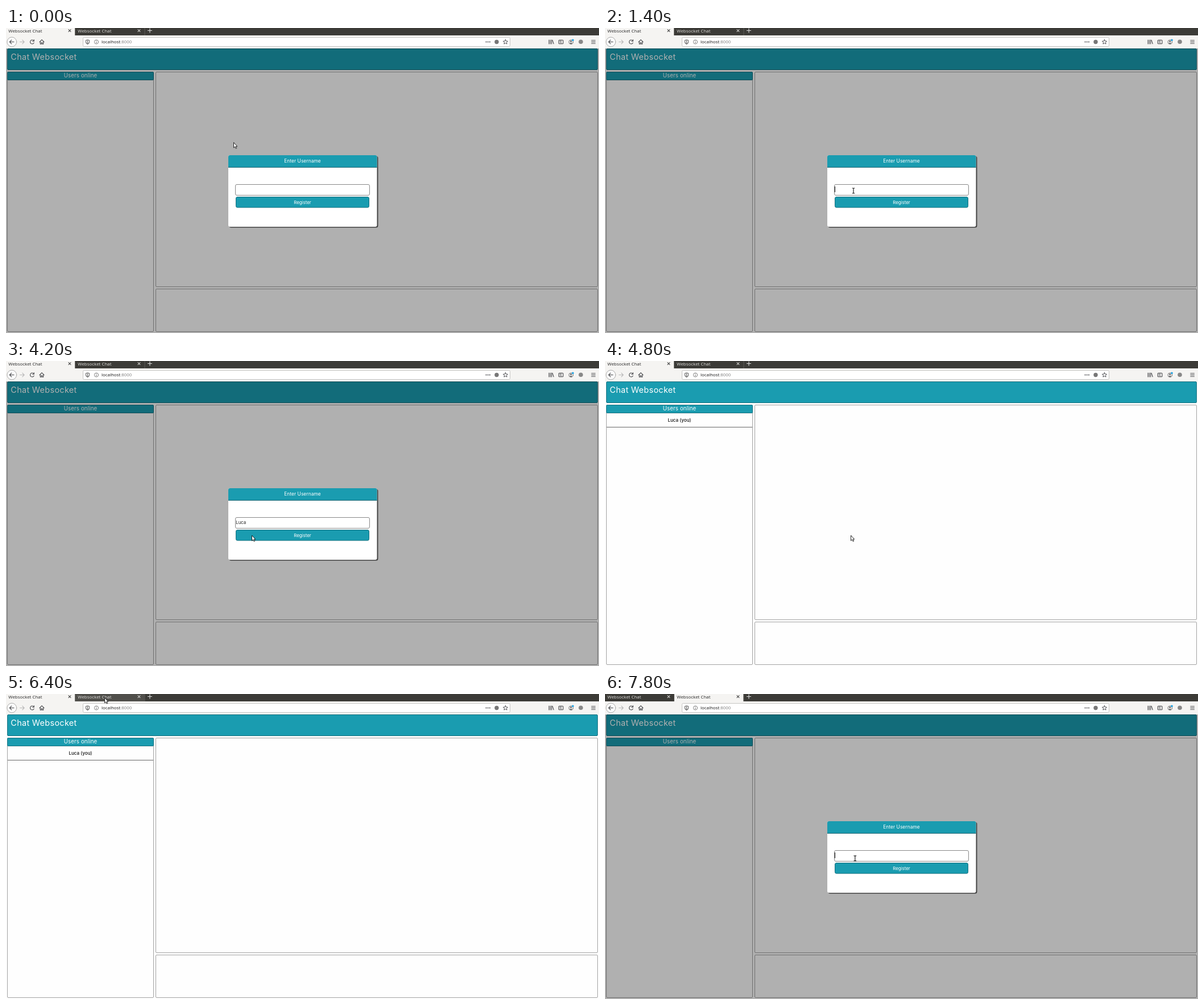
Animation, 1043 px wide and 537 px high, one loop 8 s. Source, as an HTML page:

```html
<!DOCTYPE html>
<html lang="en">
<head>
<meta charset="utf-8">
<title>Websocket Chat</title>
<style>
html, body { margin: 0; width: 100%; height: 100%; overflow: hidden; background: #fff; }
svg { display: block; width: 100%; height: 100%; }
text { white-space: pre; }
.ui { font-family: "Noto Sans", "Open Sans", sans-serif; font-size: 7.85px; }
.app { font-family: Inter, sans-serif; }
.mid { text-anchor: middle; }
.teal { fill: #1a9cb0; stroke: #15707e; }
.panel { fill: none; stroke: #a2a2a2; }
.icon { fill: none; stroke: #45464a; stroke-width: 1.1; stroke-linecap: round; stroke-linejoin: round; }
</style>
</head>
<body>
<svg viewBox="0 0 1043 537" preserveAspectRatio="none">
  <!-- Tab strip -->
  <rect width="1043" height="13" fill="#3c3b37"/>
  <g id="tabs" class="ui"></g>
  <path d="M249.5 4.5h7M253 1v7" class="icon" style="stroke:#ddd"/>

  <!-- Toolbar -->
  <rect y="13" width="1043" height="23" fill="#f5f4f2"/>
  <rect x="135.5" y="16.5" width="751" height="16" rx="2" fill="#fff" stroke="#c6c5c3"/>
  <g class="icon">
    <circle cx="10.3" cy="24.5" r="8.4" fill="#fbfbfb" stroke="#aaa" stroke-width="1"/>
    <path d="M14 24.5H6.5M9.7 21.2l-3.3 3.3 3.3 3.3"/>
    <path d="M24.5 24.5H32M28.8 21.2l3.3 3.3-3.3 3.3" stroke="#b8b8b8"/>
    <path d="M48.8 22.3A3.5 3.5 0 1 0 49.2 26M49.3 20.6v2.7h-2.7"/>
    <path d="M59 24.6l4-3.9 4 3.9M60.3 24v4.3h1.9v-2.5h1.6v2.5h1.9V24"/>
    <path d="M143.5 20.8l3 1v2.4q0 2.8-3 4.2q-3-1.4-3-4.2v-2.4z" stroke="#666"/>
    <path d="M143.5 22.3v4.6" stroke="#666"/>
    <circle cx="159" cy="24.5" r="3.6" stroke="#777" stroke-width=".9"/>
    <path d="M159 24.2v2M159 22.4v.1" stroke="#777"/>
    <path d="M844.5 24.5h.1M847.7 24.5h.1M850.9 24.5h.1" stroke-width="1.9"/>
    <path d="M878.5 20.4l1.2 2.6 2.9.3-2.2 1.9.7 2.9-2.6-1.5-2.6 1.5.7-2.9-2.2-1.9 2.9-.3z" stroke-width=".95"/>
    <path d="M955 21v7M957.3 21v7M959.6 21v7M961 21.3l2.2 6.5"/>
    <rect x="972.3" y="21.2" width="7.6" height="6.6" rx="1"/>
    <path d="M975.2 23h-1M975.2 25h-1M976.2 21.3v6.3" stroke-width=".8"/>
    <circle cx="993.7" cy="24.7" r="3.7" stroke="#666" stroke-width=".9"/>
    <path d="M1029.8 21.7h6.6M1029.8 24.5h6.6M1029.8 27.3h6.6"/>
  </g>
  <circle cx="993.7" cy="23.6" r="1.3" fill="#45464a"/>
  <path d="M991.4 27q2.3-2.2 4.6 0q-2.3 1.8-4.6 0" fill="#55565a"/>
  <circle cx="997" cy="21.2" r="1.8" fill="#1a9fe0"/>
  <circle cx="863" cy="24.5" r="3.7" fill="#777"/>
  <circle cx="1011" cy="24.3" r="3.8" fill="#888"/>
  <text class="ui" x="168" y="27.4" fill="#222">localhost<tspan fill="#858585">:8000</tspan></text>

  <!-- Chat page -->
  <g class="app">
    <rect y="36" width="1043" height="501" fill="#fefefe"/>
    <rect class="teal" x="2.5" y="36.5" width="1038" height="37" rx="1.5"/>
    <text x="8.3" y="55.6" font-size="14.5" letter-spacing=".27" fill="#fff">Chat Websocket</text>
    <rect class="panel" x="2.5" y="77.5" width="257" height="457" rx="1.5"/>
    <rect class="panel" x="263.5" y="77.5" width="777" height="378" rx="1.5"/>
    <rect class="panel" x="263.5" y="459.5" width="777" height="75" rx="1.5"/>
    <rect class="teal" x="2.5" y="77.5" width="257" height="14" rx="1"/>
    <text class="mid" x="131" y="87.3" font-size="9.7" letter-spacing=".12" fill="#fff">Users online</text>
    <g id="userRow">
      <path d="M3 116.5H259" stroke="#666"/>
      <text id="userLabel" class="mid" x="131" y="106.7" font-size="8.1" font-weight="500" fill="#111"></text>
    </g>
  </g>

  <!-- Registration dialog -->
  <g id="dialog" class="app">
    <rect y="36" width="1043" height="501" opacity=".31"/>
    <rect x="392.5" y="225.5" width="262" height="126" rx="3.5" fill="#444"/>
    <rect x="391" y="224" width="261.5" height="126" rx="3" fill="#fff"/>
    <path d="M391 245v-18q0-3 3-3h255.5q3 0 3 3v18z" fill="#1a9cb0"/>
    <path d="M391 245.3h261.5" stroke="#0d5d69"/>
    <text class="mid" x="521.5" y="237.2" font-size="8.4" letter-spacing=".05" fill="#fff">Enter Username</text>
    <rect x="403.5" y="275.5" width="236" height="19" rx="2.5" fill="#fff" stroke="#888"/>
    <text id="field" x="404.3" y="287.4" font-size="7.8" fill="#222"></text>
    <path id="caret" d="M0 279v10" stroke="#222"/>
    <rect class="teal" x="404.5" y="297.5" width="234" height="18.5" rx="2.5"/>
    <text class="mid" x="521.5" y="309.6" font-size="7.9" fill="#fff">Register</text>
  </g>

  <g id="pointer">
    <path id="arrow" d="M0 0V9.3L2.2 7.4 3.7 10.7 5.2 10 3.7 6.9H6.2Z" fill="#fff" stroke="#111" stroke-width=".9"/>
    <path id="beam" d="M-2.3-4.5H-.8L0-3.8.8-4.5H2.3M0-3.8V3.8M-2.3 4.5H-.8L0 3.8.8 4.5H2.3" fill="none" stroke="#222" stroke-width="1.2"/>
  </g>
</svg>
<script>
const LOOP = 8000;
const USER = "Luca";
const TYPED_AT = [2300, 2800, 3000, 3200];
const REGISTERED = 4800, TAB_SWITCH = 6900;

// Pointer positions: [time, x, y]; "glide" moves on every 100 ms from the previous stop.
const STOPS = [
  [100, 400.5, 201.5],
  [600, 414.5, 312, "glide"],
  [900, 414, 289, "glide"],
  [1200, 414, 289],
  [1400, 437, 286.5, "glide"],
  [4000, 435.5, 297.3],
  [4200, 432.5, 307],
  [5500, 379.5, 287.3],
  [5700, 299.5, 118.5],
  [6000, 194.5, 23],
  [6200, 173.5, 6.5],
  [7300, 422.5, 237.5],
  [7600, 451.5, 298.3],
  [7800, 439.8, 289.3]
];

const $ = id => document.getElementById(id);
const show = (id, on) => $(id).style.display = on ? "" : "none";

$("userLabel").textContent = USER + " (you)";
$("tabs").innerHTML = [0, 122].map(x => `
  <g transform="translate(${x})">
    <rect width="121.5" height="13"/>
    <text x="4.3" y="7.6">Websocket Chat</text>
    <path d="M109.7 2.3l4.6 4.6M114.3 2.3l-4.6 4.6" stroke-width="1.1"/>
  </g>`).join("") + '<path d="M121.5 0V13M244 0V13" stroke="#656460" stroke-width=".8"/>';
const tabs = [...$("tabs").querySelectorAll("g")];

function paintTab(tab, active, hovered) {
  const [back, label, cross] = tab.children;
  back.setAttribute("fill", active ? "#f5f4f2" : hovered ? "#504f4b" : "#3c3b37");
  label.setAttribute("fill", active ? "#333" : "#d9d8d5");
  cross.setAttribute("stroke", active ? "#444" : "#d0cfcc");
}

function pointerAt(time) {
  const t = Math.floor(time / 100) * 100;
  let i = 0;
  while (i + 1 < STOPS.length && STOPS[i + 1][0] <= t) i++;
  const [t0, x, y] = STOPS[i], next = STOPS[i + 1];
  if (!next || !next[3]) return [x, y];
  const p = Math.max(0, (t - t0) / (next[0] - t0));
  return [x + (next[1] - x) * p, y + (next[2] - y) * p];
}

function draw(t) {
  const second = t >= TAB_SWITCH;
  const dialog = t < REGISTERED || second;
  const [x, y] = pointerAt(t);

  paintTab(tabs[0], !second, false);
  paintTab(tabs[1], second, y < 13);
  show("userRow", !dialog);
  show("dialog", dialog);

  if (dialog) {
    const count = second ? 0 : TYPED_AT.filter(at => t >= at).length;
    $("field").textContent = USER.slice(0, count);
    const end = count ? $("field").getComputedTextLength() : 0;
    $("caret").setAttribute("transform", `translate(${Math.floor(404.3 + end) + 0.5})`);
    show("caret", second || (t >= 1100 && t < 2200) || (t >= 2300 && t < 3600));
  }

  const overField = dialog && x > 404 && x < 639 && y > 275 && y < 295;
  show("arrow", !overField);
  show("beam", overField);
  $("pointer").setAttribute("transform", `translate(${x} ${y})`);
}

function tick() {
  draw(performance.now() % LOOP);
  requestAnimationFrame(tick);
}
tick();
</script>
</body>
</html>
```
